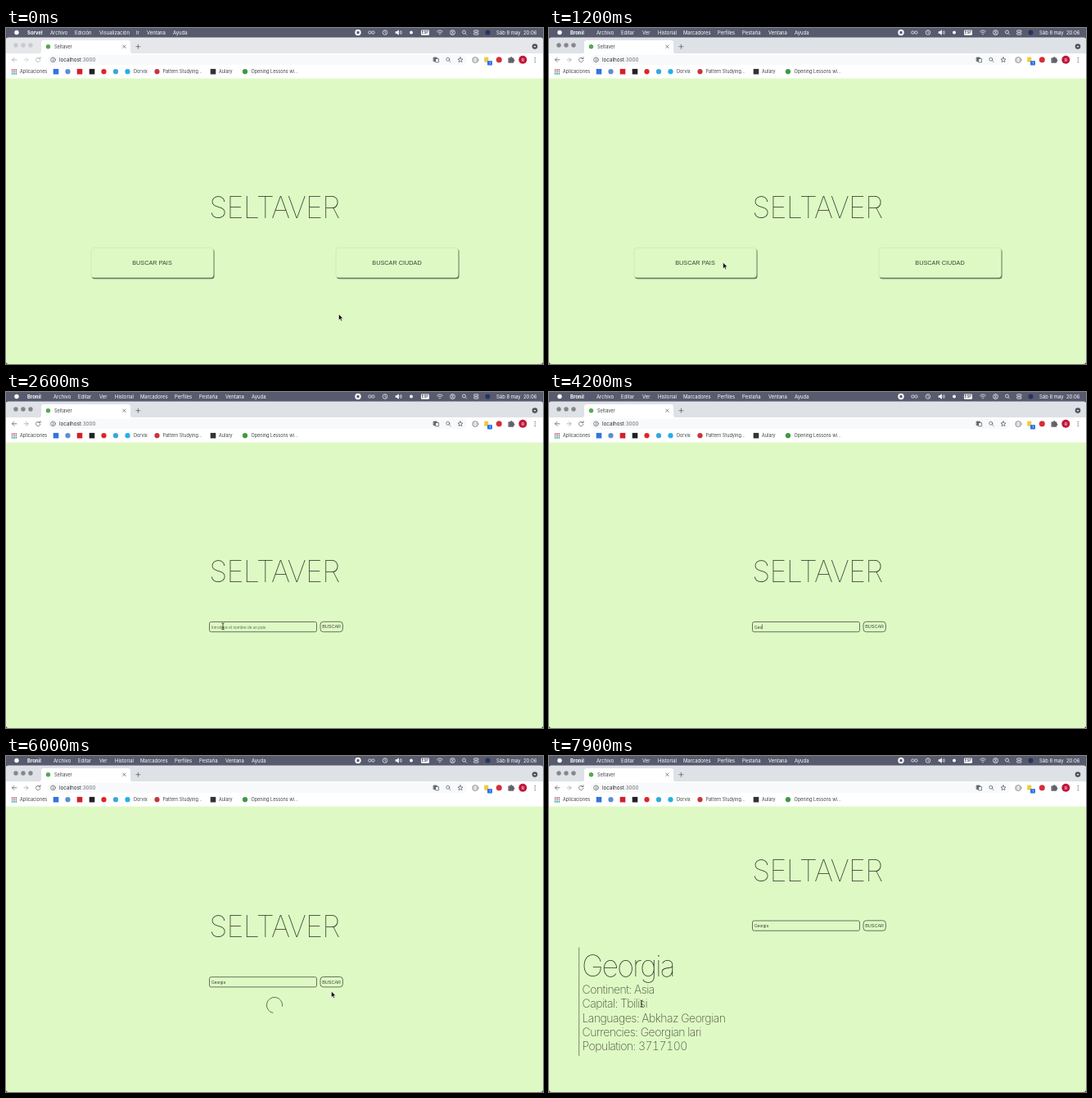
Write an HTML page that moves like this. It is 656 px wide and 410 px high and loops after 8 s.

```html
<!DOCTYPE html>
<html lang="es">
<head>
<meta charset="utf-8">
<title>Seltaver</title>
<style>
  html, body { margin: 0; width: 100%; height: 100%; overflow: hidden; background: #dff9c5; }
  svg { display: block; width: 656px; height: 410px; }
  text { font-family: Inter, "Open Sans", sans-serif; white-space: pre; }
  .menu text { font-size: 5.95px; fill: #fff; }
  .bookmarks text { font-size: 5.5px; fill: #3c4043; }
  .form text, .buttons text { font-family: "Liberation Sans", Arial, sans-serif; fill: #3b4636; }
  .thin { font-size: 36px; font-weight: 100; fill: #2f3a28; }
  .title { letter-spacing: -.8px; }
  .country { letter-spacing: -2px; }
  .facts { font-size: 14px; font-weight: 200; letter-spacing: -.52px; font-variant-numeric: tabular-nums; fill: #455039; }
  .box { fill: none; stroke: #46523d; stroke-width: .8; }
  .line { fill: none; stroke: #5f6368; stroke-width: .8; stroke-linecap: round; stroke-linejoin: round; }
  .white { fill: none; stroke: #fff; stroke-width: .7; }
</style>
</head>
<body>
<svg viewBox="0 0 656 410">
  <rect width="656" height="410" fill="#dff9c5"/>

  <g class="menu">
    <rect width="656" height="13" fill="#575b6d"/>
    <circle cx="13" cy="5.5" r="2.7" fill="#fff"/>
    <g id="idleMenu"></g>
    <g id="activeMenu"></g>
    <circle cx="430" cy="5.5" r="3.7" fill="#fff"/><rect x="428.5" y="4" width="3" height="3" rx=".5" fill="#575b6d"/>
    <g class="white">
      <circle cx="444.4" cy="5.5" r="1.7"/><circle cx="448.4" cy="5.5" r="1.7"/>
      <circle cx="463" cy="5.5" r="2.8"/><path d="M463 3.6V5.7L464.4 6.4"/>
      <path d="M476 4.5h1.5l2-1.7v5.4l-2-1.7h-1.5z" fill="#fff"/><path d="M481 4q1.3 1.5 0 3M482.4 3q2 2.5 0 5"/>
      <path d="M526.3 4.5q3.7-3.2 7.4 0M527.7 6q2.3-2 4.6 0"/><circle cx="530" cy="7.6" r=".4"/>
      <circle cx="545.5" cy="5.5" r="3"/><circle cx="545.5" cy="4.7" r=".9"/><path d="M543.7 7.6q1.8-2 3.6 0"/>
      <circle cx="559.5" cy="5" r="2"/><path d="M561 6.5L562.8 8.3"/>
      <rect x="571.5" y="2.8" width="5.6" height="2.2" rx="1.1"/><rect x="571.5" y="6" width="5.6" height="2.2" rx="1.1"/>
    </g>
    <circle cx="495" cy="5.5" r="2" fill="#fff"/>
    <rect x="507" y="2.5" width="10" height="6.3" rx="1" fill="#fff"/>
    <text x="512" y="7.4" text-anchor="middle" style="font-size:4.4px;font-weight:700;fill:#575b6d">ESP</text>
    <circle cx="588.5" cy="5.5" r="3" fill="#27345f"/>
    <text x="599" y="7.7">Sáb 8 may  20:06</text>
  </g>

  <path id="strip" d="M0 34V14Q0 11.5 3 11.5H653Q656 11.5 656 14V34Z"/>
  <g id="lights"><circle cx="12" cy="21" r="2.7"/><circle cx="21" cy="21" r="2.7"/><circle cx="30" cy="21" r="2.7"/></g>
  <path d="M40 31.5Q43 31 43 28V18Q43 15 46 15H149Q152 15 152 18V28Q152 31 155 31.5Z" fill="#fff"/>
  <circle cx="51.5" cy="22.7" r="2.7" fill="#55a850"/>
  <text x="59" y="24.7" font-size="5.6" fill="#3c4043">Seltaver</text>
  <path class="line" d="M142.8 21l3.4 3.4m0-3.4l-3.4 3.4M158.9 22.7h5m-2.5-2.5v5"/>
  <circle cx="646" cy="22.6" r="3.3" fill="#50545a"/><path d="M644.5 22h3l-1.5 1.8z" fill="#fff"/>

  <rect y="31" width="656" height="30.5" fill="#fff"/>
  <rect x="51" y="32.5" width="512" height="12.5" rx="6.2" fill="#f8f9fa"/>
  <g id="nav" class="line">
    <path d="M13 38.8H7.5m2.5-2.5l-2.5 2.5 2.5 2.5"/>
    <path d="M22 38.8h5m-2.5-2.5l2.5 2.5-2.5 2.5" opacity=".55"/>
    <path d="M41.3 37.1a2.7 2.7 0 1 0 .6 2.3m.1-3.8v2h-2"/>
  </g>
  <g class="line">
    <circle cx="57.5" cy="38.8" r="2.8"/><path d="M57.5 38.6v1.6m0-3v.1"/>
    <rect x="522.5" y="36" width="3.8" height="4.6" fill="#5f6368"/><rect x="525" y="37.5" width="3.6" height="4.3" fill="#fff"/>
    <circle cx="539.8" cy="38.2" r="2"/><path d="M541.4 39.8l1.7 1.7"/>
    <path d="M555 35.8l.9 2 2.1.2-1.6 1.4.5 2.1-1.9-1.1-1.9 1.1.5-2.1-1.6-1.4 2.1-.2z"/>
    <circle cx="573.3" cy="39" r="3.4"/><path d="M572.4 37.6q-1 .2-.5 1.4.4 1.3.5 1.4m1.8-2.8q1 .2.5 1.4-.4 1.3-.5 1.4" stroke-width=".5"/>
    <path d="M614.2 36.8h2q0-1.4 1-1.4t1 1.4h1.7v1.8q1.2 0 1.2 1t-1.2 1v1.6h-5.7z" fill="#5f6368"/>
  </g>
  <text x="65" y="41.1" font-size="6.3" fill="#26282c">localhost<tspan fill="#6a6e73">:3000</tspan></text>
  <rect x="584.3" y="35.6" width="5" height="6" fill="#f0c93a"/>
  <rect x="588" y="40" width="6" height="5.5" rx="1" fill="#2f74e8"/><text x="591" y="44.4" font-size="4" fill="#fff" text-anchor="middle">1</text>
  <circle cx="602.3" cy="38.8" r="3.5" fill="#d52f36"/>
  <circle cx="631.3" cy="38.8" r="5" fill="#c2183b"/><text x="631.3" y="40.8" font-size="5.2" fill="#fff" text-anchor="middle">R</text>
  <g fill="#5f6368"><circle cx="646.3" cy="36.4" r=".7"/><circle cx="646.3" cy="38.9" r=".7"/><circle cx="646.3" cy="41.4" r=".7"/></g>
  <g id="bookmarks" class="bookmarks"></g>

  <g id="page">
    <text class="thin title" x="328" y="232" text-anchor="middle">SELTAVER</text>
    <g id="buttons" class="buttons"></g>
    <g id="form" class="form">
      <rect class="box" x="248.5" y="280.5" width="131" height="12.2" rx="2"/>
      <text id="field" x="251" y="288.5" font-size="4.8"></text>
      <path id="caret" d="M0 283.4v6" stroke="#26301f" stroke-width=".6"/>
      <rect class="box" x="384" y="280.3" width="27.4" height="12.4" rx="3.6"/>
      <text x="397.6" y="288.4" font-size="5.5" text-anchor="middle">BUSCAR</text>
    </g>
  </g>
  <circle id="spinner" cx="328" cy="304" r="9.6" fill="none" stroke="#4b5942" stroke-width=".8" pathLength="4" stroke-dasharray="3 1"/>
  <g id="result">
    <path d="M36.7 233.5V366" stroke="#5d6b53" stroke-width=".8"/>
    <text class="thin country" x="40" y="268.5">Georgia</text>
  </g>
  <path d="M0 407V410H3Q0 410 0 407ZM656 407V410H653Q656 410 656 407Z" fill="#302a28"/>
  <path id="arrow" d="M0 0V7.2L1.7 5.7L2.8 8.2L4 7.7L2.9 5.2H5.2Z" fill="#000" stroke="#fff" stroke-width=".5"/>
  <path id="beam" d="M-1.6-4Q0-4 0-3Q0-4 1.6-4M0-3V3M-1.6 4Q0 4 0 3Q0 4 1.6 4M-1 1H1" fill="none" stroke="#1c2318" stroke-width=".8"/>
</svg>

<script>
const LOOP = 8000, STEP = 100;
const at = { focus: 1000, form: 2000, caret: 3200, type: 3600, move: 5200, load: 5700, result: 6300 };
const keys = [[3600, 1], [3900, 2], [4100, 3], [4400, 4], [4600, 5], [4800, 6], [4900, 7]];
const path = [
  [0, 406.5, 349.2], [900, 216, 288], [1200, 212.7, 286.3], [1700, 191.5, 292], [2200, 191.5, 292],
  [2600, 265, 286], [5100, 265, 286], [5600, 397.5, 286.5], [5900, 397.5, 287.2], [7000, 397.5, 287.2],
  [7600, 143, 312], [7800, 99, 294], [7900, 113, 302], [8000, 113, 302]
];

const el = Object.fromEntries([...document.querySelectorAll("[id]")].map(e => [e.id, e]));
const add = (parent, markup) => parent.insertAdjacentHTML("beforeend", markup);
const show = (node, on) => node.setAttribute("display", on ? "inline" : "none");
const place = (node, x, y) => node.setAttribute("transform", `translate(${x} ${y})`);

function fillMenu(group, items) {
  items.forEach(([x, label], i) =>
    add(group, `<text x="${x}" y="7.7" font-weight="${i ? 400 : 700}">${label}</text>`));
}

fillMenu(el.idleMenu, [[26, "Sorvel"], [54, "Archivo"], [84, "Edición"], [114, "Visualización"],
  [159, "Ir"], [172, "Ventana"], [204, "Ayuda"]]);
fillMenu(el.activeMenu, [[26, "Bronil"], [58, "Archivo"], [88, "Editar"], [114, "Ver"], [133, "Historial"],
  [164, "Marcadores"], [206, "Perfiles"], [236, "Pestaña"], [268, "Ventana"], [300, "Ayuda"]]);

const dots = ["#ea4335", "#4285f4", "#34a853"];
for (let i = 0; i < 9; i++) {
  add(el.bookmarks, `<rect x="${6.8 + i % 3 * 2.4}" y="${50.3 + Math.floor(i / 3) * 2.4}" width="1.6" height="1.6" fill="${dots[Math.floor(i / 3)]}"/>`);
}
[[61, "#3474dc", 1], [75.5, "#5b8fd0"], [90, "#d3202c", 1], [105, "#222", 1], [119.5, "#e02424"],
  [134, "#35a9dc"], [148.5, "#25b0e6"], [184.5, "#c8353c"], [253, "#333", 1], [292, "#3f9a42"]
].forEach(([x, color, square]) => add(el.bookmarks, square
  ? `<rect x="${x - 3.3}" y="49.9" width="6.6" height="6.6" fill="${color}"/>`
  : `<circle cx="${x}" cy="53.2" r="3.1" fill="${color}"/>`));
[[17, "Aplicaciones"], [156, "Dorvix"], [191.5, "Pattern Studying..."], [260, "Aulary"], [299.5, "Opening Lessons wi..."]]
  .forEach(([x, label]) => add(el.bookmarks, `<text x="${x}" y="55.2">${label}</text>`));

[[104, "BUSCAR PAIS"], [403, "BUSCAR CIUDAD"]].forEach(([x, label]) => add(el.buttons, `
  <rect x="${x + .8}" y="269.5" width="149.8" height="36.8" rx="3.5" fill="#68795f"/>
  <rect x="${x}" y="268.2" width="149.4" height="36.4" rx="3.5" fill="#dff9c5" stroke="#c3dcae" stroke-width=".5"/>
  <text x="${x + 74.5}" y="288.7" font-size="7.3" text-anchor="middle">${label}</text>`));

["Continent: Asia", "Capital: Tbilisi", "Languages: Abkhaz Georgian", "Currencies: Georgian lari", "Population: 3717100"]
  .forEach((line, i) => add(el.result, `<text class="facts" x="40.5" y="${290 + i * 17.25}">${line}</text>`));

function pointer(t) {
  const i = path.findIndex(p => p[0] > t);
  const [t0, x0, y0] = path[i - 1], [t1, x1, y1] = path[i];
  const k = (t - t0) / (t1 - t0), ease = k * k * (3 - 2 * k);
  return [x0 + (x1 - x0) * ease, y0 + (y1 - y0) * ease];
}

function draw(t) {
  const active = t >= at.focus, form = t >= at.form;
  const loading = t >= at.load && t < at.result, done = t >= at.result;

  show(el.idleMenu, !active);
  show(el.activeMenu, active);
  el.strip.setAttribute("fill", active ? "#dee1e6" : "#e5e7ea");
  el.lights.setAttribute("fill", active ? "#85878b" : "#c9cbce");
  el.nav.setAttribute("opacity", active ? 1 : .55);

  place(el.page, 0, done ? -79.5 : loading ? -10.8 : 0);
  show(el.buttons, !form);
  show(el.form, form);
  show(el.spinner, loading);
  show(el.result, done);
  el.spinner.setAttribute("transform", `rotate(${100 + (t - 6000) * .36} 328 304)`);

  const typed = keys.filter(k => t >= k[0]).length;
  el.field.textContent = typed ? "Georgia".slice(0, typed) : "Introduce el nombre de un pais";
  el.field.setAttribute("opacity", typed ? 1 : .75);
  const focused = t >= at.caret && t < at.load;
  show(el.caret, focused);
  if (focused) place(el.caret, 251.3 + (typed ? el.field.getComputedTextLength() : 0), 0);

  const [x, y] = pointer(t);
  const hidden = t >= at.type && t < at.move;
  const overField = form && !done && x > 248 && x < 380;
  const overText = done && x < 121;
  const beam = overField || overText;
  place(el.arrow, x, y);
  place(el.beam, x, y);
  show(el.arrow, !hidden && !beam);
  show(el.beam, !hidden && beam);
}

const start = performance.now();
function tick() {
  const t = (performance.now() - start) % LOOP;
  draw(Math.floor(t / STEP) * STEP);
  requestAnimationFrame(tick);
}
draw(0);
requestAnimationFrame(tick);
</script>
</body>
</html>
```
